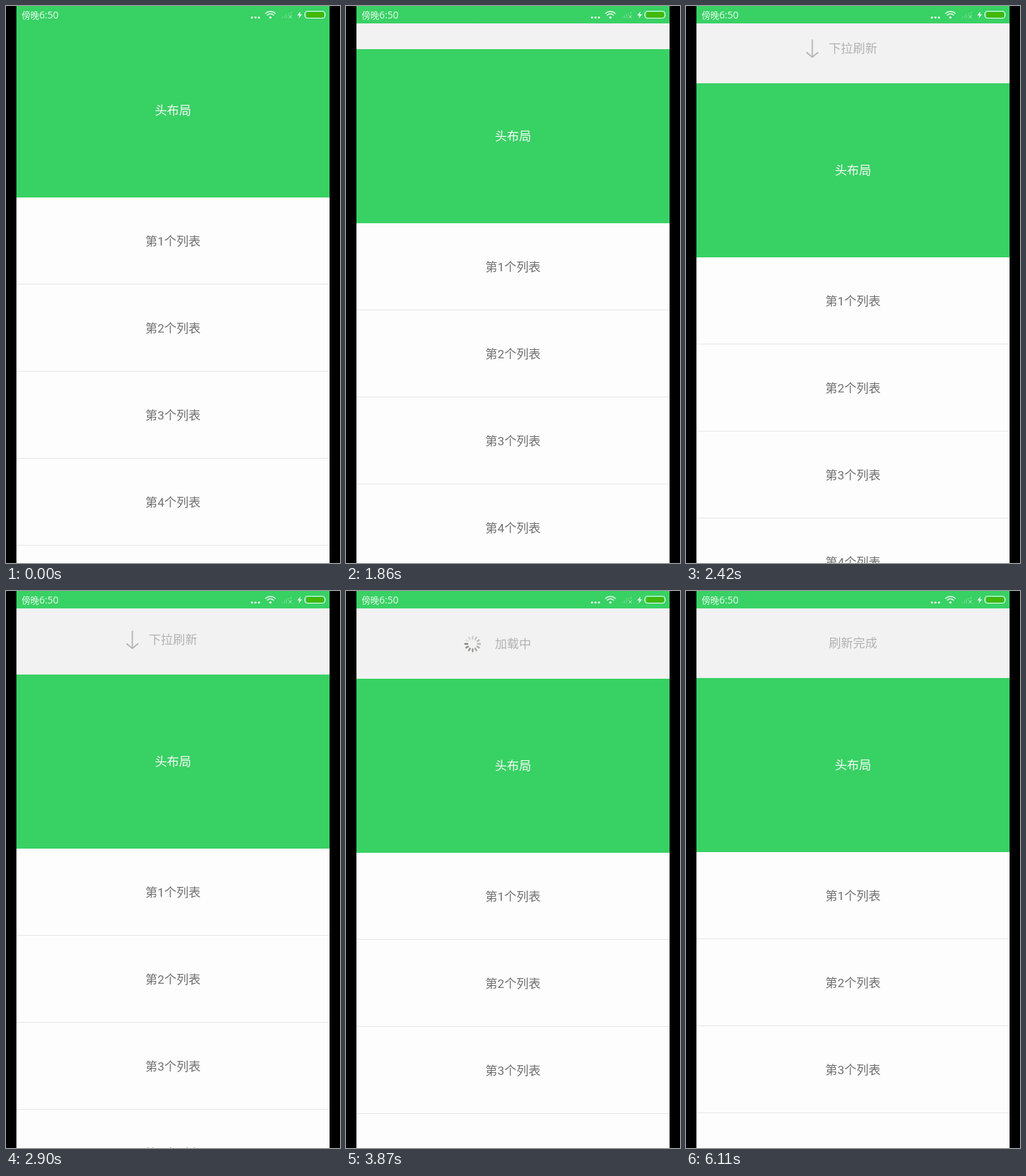
An HTML page that plays this animation: 480x800 px, repeating every 6330 ms.

```html
<!DOCTYPE html>
<html lang="zh-CN">
<head>
<meta charset="utf-8">
<style>
html, body { margin: 0; width: 100%; height: 100%; overflow: hidden; background: #000; }
svg { display: block; width: 480px; height: 800px; }
text { font: 17.4px Roboto, "Noto Sans CJK SC", "Noto Sans CJK", sans-serif; text-anchor: middle; }
.clock { font-size: 12.6px; text-anchor: start; }
.clock tspan { font: 14px "Open Sans", sans-serif; }
</style>
</head>
<body>
<svg viewBox="0 0 480 800">
  <defs><clipPath id="body"><path d="M15 25H465V800H15z"/></clipPath></defs>
  <rect width="480" height="800"/>
  <g clip-path="url(#body)">
    <rect x="15" y="25" width="450" height="775" fill="#f2f2f2"/>
    <g id="content">
      <rect x="15" y="25" width="450" height="250" fill="#38d164"/>
      <text x="240" y="156" fill="#fafafa">头布局</text>
      <rect x="15" y="275" width="450" height="525" fill="#fdfdfd"/>
      <g id="rows"></g>
    </g>
    <g id="header">
      <text id="label" x="240" y="6" fill="#b2b2b2"></text>
      <path id="arrow" d="M181.500-13V12.500M173 5.500L181.500 12.500L190 5.500" fill="none" stroke="#b2b2b2" stroke-width="1.700"/>
      <g id="spinner" stroke="#85857f" stroke-width="2.4" stroke-linecap="round"></g>
    </g>
  </g>
  <rect x="15" width="450" height="25" fill="#38d164"/>
  <g fill="#eafaef">
    <text class="clock" x="22.500" y="17.500">傍晚<tspan>6:50</tspan></text>
    <circle cx="353.500" cy="16.500" r="1.600"/>
    <circle cx="358.500" cy="16.500" r="1.600"/>
    <circle cx="363.500" cy="16.500" r="1.600"/>
    <circle cx="380" cy="16.500" r="1.700"/>
    <path d="M423 8L418.500 13.500H421.500L420.500 18L425.500 12H422.500z"/>
  </g>
  <g fill="none" stroke="#eafaef" stroke-width="1.500">
    <path d="M372.500 11Q380 4.500 387.500 11M375 13.500Q380 9 385 13.500"/>
    <path d="M406.500 13.500L410.500 17.500M410.500 13.500L406.500 17.500" stroke-width="1" opacity=".75"/>
    <path d="M397 17.500V15.500M400 17.500V13.500M403 17.500V11.500M406 12V10M409.500 12V8" opacity=".25"/>
    <rect x="429.500" y="7.500" width="29" height="10" rx="4" stroke-width="1.200"/>
  </g>
  <rect x="432" y="9" width="25" height="7.500" rx="2" fill="#43b806"/>
</svg>
<script>
const LOOP = 6330, READY = 3610, LOADING = 3870, DONE = 5890, TURN = 180;
// [time, pull distance]
const PULL = [[1580, 2], [1860, 37], [2000, 55], [2180, 75], [2279, 75], [2420, 86],
  [2900, 95], [3230, 99], [3330, 99], [3510, 100], [3600, 100], [READY, 101],
  [LOADING, 101], [LOADING + 100, 100]];
const $ = id => document.getElementById(id);

function add(parent, tag, attrs, text = '') {
  const node = document.createElementNS('http://www.w3.org/2000/svg', tag);
  for (const key in attrs) node.setAttribute(key, attrs[key]);
  node.textContent = text;
  return parent.appendChild(node);
}

for (let i = 0; i < 4; i++) {
  const top = 275 + 125 * i;
  add($('rows'), 'text', { x: 240, y: top + 69, fill: '#707070' }, `第${i + 1}个列表`);
  add($('rows'), 'rect', { x: 15, y: top + 124, width: 450, height: 1, fill: '#e6e6e9' });
}

const spokes = Array.from({ length: 12 }, (_, i) => add($('spinner'), 'path', {
  d: 'M0-7.500V-10.800', transform: `translate(182 0) rotate(${i * 30})`
}));

function pullAt(t) {
  if (t < PULL[0][0]) return 0;
  const next = PULL.findIndex(p => p[0] > t);
  if (next < 0) return 100;
  const [t0, y0] = PULL[next - 1], [t1, y1] = PULL[next];
  return Math.round(y0 + (y1 - y0) * (t - t0) / (t1 - t0));
}

function labelAt(t) {
  if (t < READY) return '下拉刷新';
  if (t < LOADING) return '释放刷新';
  return t < DONE ? '加载中' : '刷新完成';
}

function show(id, on) {
  $(id).setAttribute('visibility', on ? 'visible' : 'hidden');
}

function draw(t) {
  const pull = pullAt(t);
  $('content').setAttribute('transform', `translate(0 ${pull})`);
  $('header').setAttribute('transform', `translate(0 ${pull - 25})`);
  $('label').textContent = labelAt(t);

  const turn = Math.min(1, Math.max(0, (t - READY) / TURN));
  $('arrow').setAttribute('transform', `rotate(${-180 * turn} 181.5 0)`);
  show('arrow', t < LOADING);
  show('spinner', t >= LOADING && t < DONE);

  // The head of the spinner moves one spoke clockwise every 100 ms
  const head = 1 + Math.floor((t - 4270) / 100);
  spokes.forEach((spoke, i) => {
    const age = (((head - i) % 12) + 12) % 12;
    spoke.setAttribute('opacity', 1 - age * 0.075);
  });
}

const start = performance.now();
function tick() {
  draw((performance.now() - start) % LOOP);
  requestAnimationFrame(tick);
}
tick();
</script>
</body>
</html>
```
